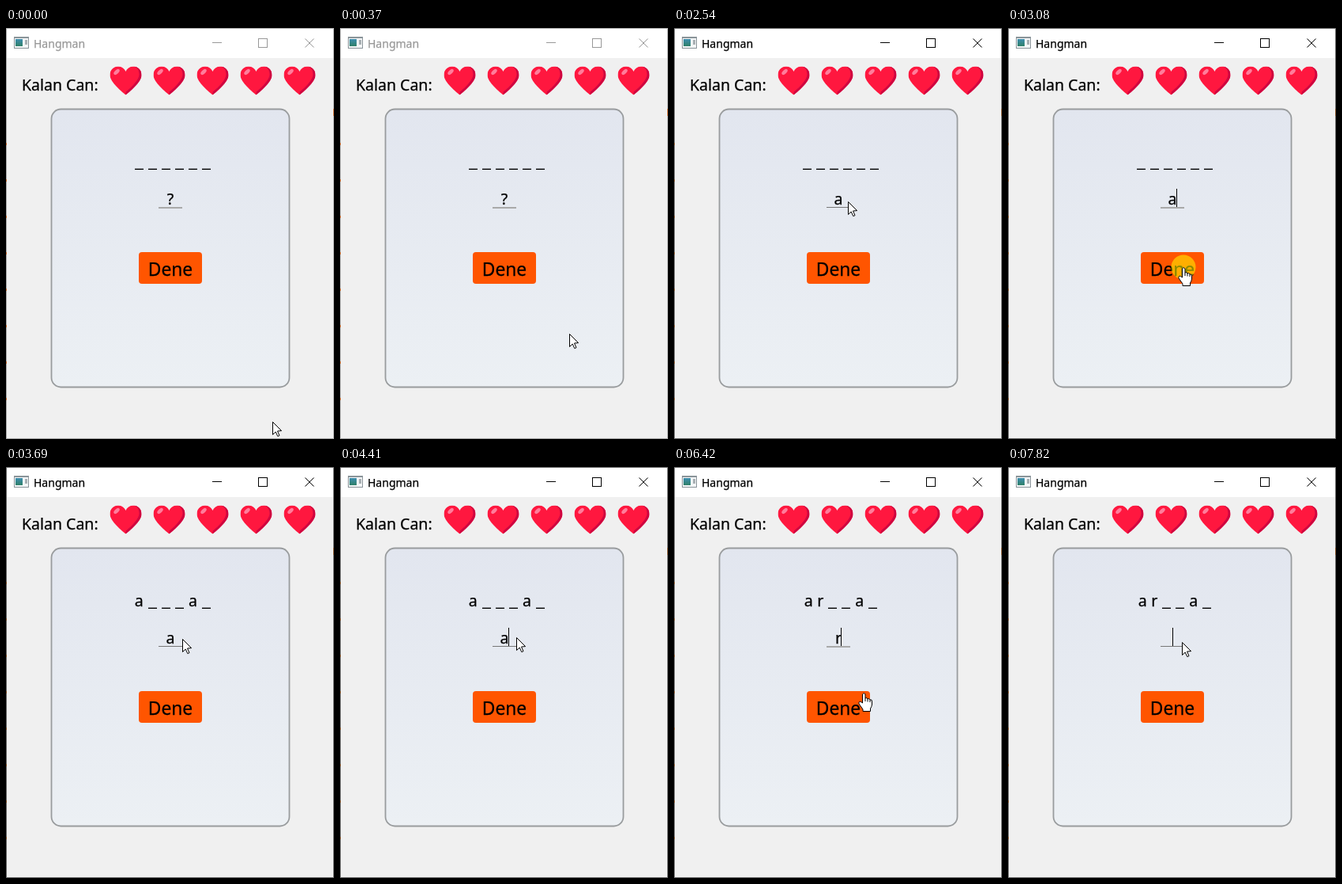
Animation of 415x519 px, one loop 8000 ms. Source, as an HTML page with a canvas:

```html
<!DOCTYPE html>
<html lang="tr">
<head>
<meta charset="utf-8">
<title>Hangman</title>
<style>
html, body { margin: 0; width: 100%; height: 100%; overflow: hidden; background: #f0f0f0; }
canvas { display: block; }
</style>
</head>
<body>
<canvas id="stage" width="415" height="519"></canvas>
<script>
const ctx = document.getElementById('stage').getContext('2d');
const LOOP = 8000, STEP = 76, PRESS = 90, BLINK = 535;
const SANS = '"Noto Sans", "Open Sans", sans-serif';
const MID = 208;

// Pointer moves: start time, number of steps, end point
const START = { x: 337, y: 497 };
const MOVES = [
  { at: 70, steps: 9, x: 220, y: 219 },
  { at: 2700, steps: 4, x: 222, y: 302 },
  { at: 3310, steps: 6, x: 223, y: 217 },
  { at: 3860, steps: 1, x: 223, y: 215 },
  { at: 5730, steps: 5, x: 246, y: 303 },
  { at: 6345, steps: 6, x: 220, y: 221 }
];
const FIELD_CLICKS = [700, 4010, 6820];
const GUESSES = [{ at: 3080, letter: 'a' }, { at: 6190, letter: 'r' }];
const EDITS = [
  { at: 0, text: '?' }, { at: 1840, text: '' }, { at: 1990, text: 'a' },
  { at: 4940, text: '' }, { at: 5340, text: 'r' }, { at: 7820, text: '' }
];
const CLICKS = [...FIELD_CLICKS, ...GUESSES.map(g => g.at)];
const SECRET = [...'ar..a.'];
const ADVANCE = { a: 10.5, r: 7.2, _: 10.9 }, GAP = 6.25;

const HEART = new Path2D('M20 36C16 32.5 0 20 0 11C0 4 5 0 10.5 0C15 0 18.5 3 20 6.5C21.5 3 25 0 29.5 0C35 0 40 4 40 11C40 20 24 32.5 20 36Z');
const ARROW = new Path2D('M.5 .5V16.5L4.2 13L6.8 18.6L9 17.6L6.5 12L11.6 11.6Z');
const HAND = new Path2D('M-1.5 13V2Q.3 -1 2 2V7Q4 5.5 5 8Q7 6.5 8 9Q10.5 8 10.5 11V15Q10 18 8.5 20V23.5H-1V21L-6 14Q-6.5 10.5 -3.5 11.5ZM2 7V11M5 8V11.5M8 9V12');

const smoother = p => p * p * p * (p * (6 * p - 15) + 10);

function pointerAt(t) {
  let { x, y } = START;
  for (const m of MOVES.filter(m => m.at <= t)) {
    const step = Math.floor((t - m.at) / STEP) + 1;
    const e = smoother(Math.min(1, step / m.steps));
    x += (m.x - x) * e;
    y += (m.y - y) * e;
  }
  return { x: Math.floor(x), y: Math.floor(y) };
}

function rect(x, y, w, h, color) {
  ctx.fillStyle = color;
  ctx.fillRect(x, y, w, h);
}

// A hairline outline gives the letters the weight of hinted screen text
function text(str, x, y, size, color = '#000', align = 'center') {
  ctx.font = size + 'px ' + SANS;
  ctx.textAlign = align;
  ctx.fillStyle = ctx.strokeStyle = color;
  ctx.lineWidth = 0.25;
  ctx.fillText(str, x, y);
  ctx.strokeText(str, x, y);
}

function rounded(x, y, w, h, r, fill) {
  ctx.beginPath();
  ctx.roundRect(x, y, w, h, r);
  ctx.fillStyle = fill;
  ctx.fill();
}

function gradient(y0, y1, from, to) {
  const g = ctx.createLinearGradient(0, y0, 0, y1);
  g.addColorStop(0, from);
  g.addColorStop(1, to);
  return g;
}

function titleBar(active) {
  const ink = active ? '#000' : '#999';
  rect(0, 0, 415, 38, '#fff');
  rect(10, 11, 19, 15, '#8a9499');
  rect(11, 13, 17, 12, '#f4f6f7');
  rect(12, 14, 9, 9, gradient(14, 23, '#3f8fb0', '#2f8068'));
  rect(24, 15, 3, 6, '#a9b0b4');
  text('Hangman', 35, 25, 14, ink, 'left');
  rect(261, 18, 12, 1, ink);
  ctx.strokeStyle = ink;
  ctx.lineWidth = 1;
  ctx.strokeRect(319.5, 13.5, 11, 11);
  ctx.stroke(new Path2D('M378.5 13.5l11 11m0 -11l-11 11'));
}

function heart(x) {
  ctx.save();
  ctx.translate(x, 48.5);
  ctx.clip(HEART);
  rect(0, 0, 40, 36, '#ff173f');
  // dark rim on the right: the heart minus its copy shifted left
  const rim = new Path2D('M-9 -9H60V60H-9Z');
  rim.addPath(HEART, new DOMMatrix([1, 0, 0, 1, -3, -1]));
  ctx.beginPath();
  ctx.rect(20, 0, 20, 36);
  ctx.clip();
  ctx.fillStyle = '#cf0540';
  ctx.fill(rim, 'evenodd');
  ctx.restore();
  ctx.fillStyle = '#ff7d9b';
  ctx.beginPath();
  ctx.ellipse(x + 8.5, 55.5, 4.5, 2.4, -0.75, 0, 7);
  ctx.fill();
}

function panel() {
  rounded(57.5, 102.5, 301, 351, 12, gradient(102, 454, '#e2e6ef', '#ecf0f4'));
  ctx.strokeStyle = '#999c9e';
  ctx.lineWidth = 1.8;
  ctx.stroke();
  rounded(168, 283, 80, 40, 4, '#ff5500');
  text('Dene', MID, 312.5, 22.8);
}

function word(t) {
  const known = GUESSES.filter(g => t >= g.at + PRESS).map(g => g.letter);
  const chars = SECRET.map(c => known.includes(c) ? c : '_');
  let x = 211 - chars.reduce((sum, c) => sum + ADVANCE[c] + GAP, -GAP) / 2;
  for (const c of chars) {
    if (c === '_') rect(Math.round(x), 177.6, 11, 1.4, '#000');
    else text(c, x + ADVANCE[c] / 2, 176, 19.6);
    x += ADVANCE[c] + GAP;
  }
}

function caretOn(t) {
  if (t < FIELD_CLICKS[0]) return false;
  const typed = EDITS.map(e => e.at);
  const released = FIELD_CLICKS.map(c => c + PRESS);
  const last = Math.max(...[...typed, ...released].filter(s => s - PRESS < t && (s <= t || released.includes(s))));
  return Math.floor(Math.max(0, t - last) / BLINK) % 2 === 0;
}

function field(t, p) {
  const hover = p.x > 192 && p.x < 227 && p.y > 200 && p.y < 228;
  if (hover) rect(193, 226, 30, 1, '#777');
  else rect(193, 226, 30, 2, '#a9a9a9');
  const str = EDITS.filter(e => e.at <= t).pop().text;
  text(str, MID, 223, 19.6);
  const end = Math.floor(MID + ctx.measureText(str).width * 0.48);
  if (caretOn(t)) rect(end, 203, 1, 23, '#000');
}

// Window edge with bits of the desktop showing through
function frameEdge(active) {
  ctx.strokeStyle = active ? '#626262' : '#a6a6a6';
  ctx.lineWidth = 1;
  ctx.strokeRect(0.5, 0.5, 414, 518);
  const mark = active ? '#7a4a20' : '#c4682c';
  for (let i = 0; i < 8; i++) rect(0, 145 + 46 * i, 1, 3, mark);
  rect(414, 102, 1, 9, mark);
}

function pointer(p, pressed) {
  if (pressed) {
    ctx.fillStyle = 'rgba(255, 250, 0, 0.55)';
    ctx.beginPath();
    ctx.arc(p.x, p.y, 15.5, 0, 7);
    ctx.fill();
  }
  const overButton = p.x >= 168 && p.x < 248 && p.y >= 283 && p.y < 323;
  const shape = overButton ? HAND : ARROW;
  ctx.save();
  ctx.translate(p.x, p.y);
  ctx.fillStyle = '#fff';
  ctx.fill(shape);
  ctx.strokeStyle = '#000';
  ctx.lineWidth = 1;
  ctx.stroke(shape);
  ctx.restore();
}

function draw(t) {
  const active = t >= FIELD_CLICKS[0];
  const p = pointerAt(t);
  rect(0, 0, 415, 519, '#f0f0f0');
  titleBar(active);
  text('Kalan Can:', 20, 79, 19.5, '#000', 'left');
  for (let i = 0; i < 5; i++) heart(131.5 + i * 55);
  panel();
  word(t);
  field(t, p);
  frameEdge(active);
  pointer(p, CLICKS.some(c => t >= c && t < c + PRESS));
}

function tick() {
  draw(performance.now() % LOOP);
  requestAnimationFrame(tick);
}
tick();
</script>
</body>
</html>
```
